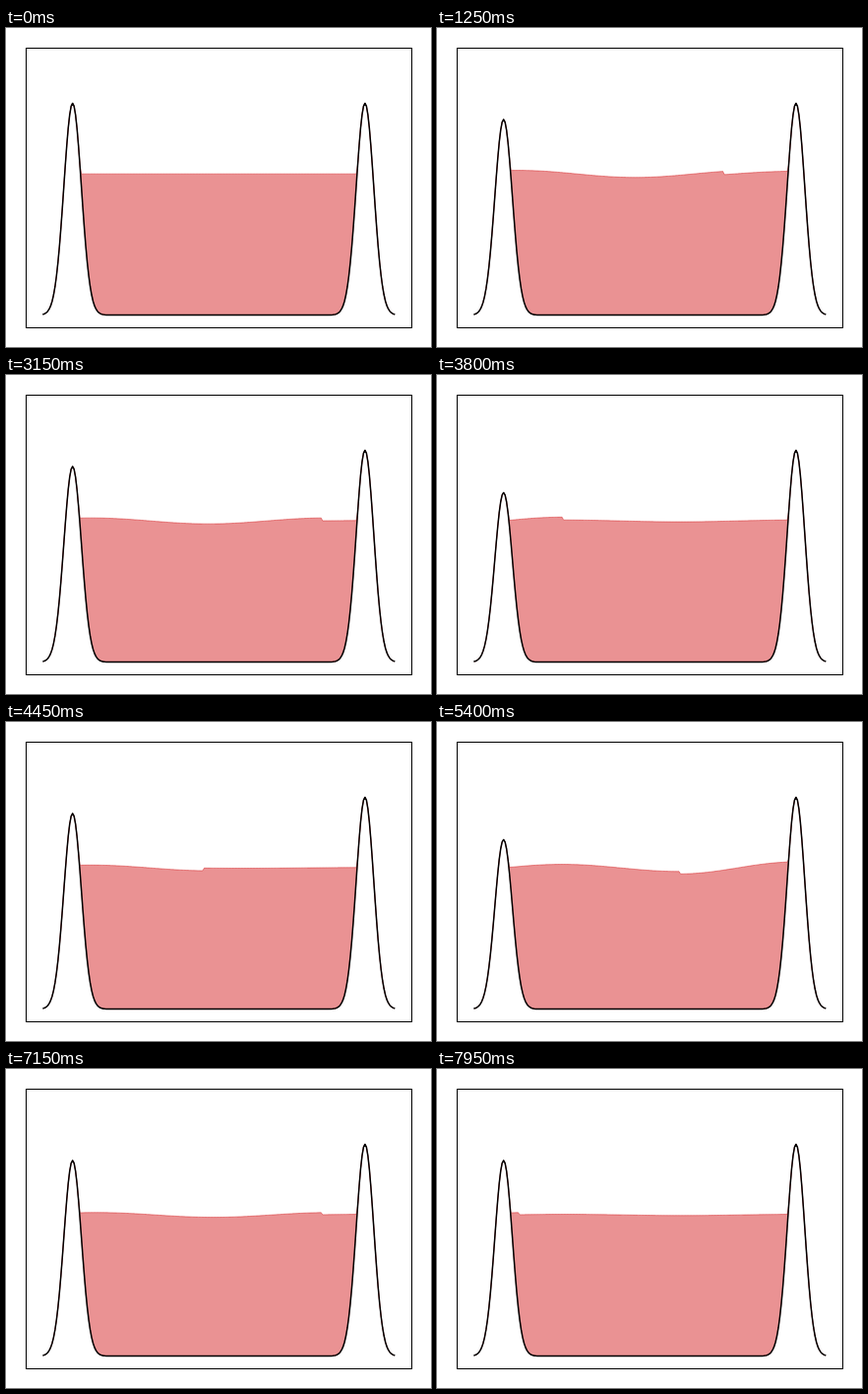
An HTML page that plays this animation: 432 by 324 pixels, repeating every 8000 ms.

```html
<!DOCTYPE html>
<html lang="en">
<head>
<meta charset="utf-8">
<title>Waves between two barriers</title>
<style>
  html, body { margin: 0; width: 100%; height: 100%; overflow: hidden; background: #fff; }
  svg { display: block; width: 100vw; height: 100vh; }
</style>
</head>
<body>
<svg viewBox="0 0 432 324">
  <path id="fluid" fill="#d62728" stroke="#d62728" stroke-width="1" opacity="1"
        fill-opacity=".5" stroke-opacity=".5" stroke-linejoin="round"/>
  <path id="wall" fill="none" stroke="#000" stroke-width="1.5"
        stroke-linejoin="round" stroke-linecap="square"/>
  <rect x="20.5" y="20.5" width="392" height="284" fill="none" stroke="#000" stroke-width="1"/>
</svg>
<script>
const STEP = 50, FRAMES = 160;
const POINTS = 240;
const SPAN = 10;          // distance between the barriers
const SIGMA = 0.3;
const LEVEL = 2;
const AMP = 0.05;
const REFLECT = 0.93;     // kept at each bounce
const K = Math.PI / 4;
const SPEED = 0.5;        // units per step

const fluid = document.getElementById('fluid');
const wall = document.getElementById('wall');

const px = x => (216.3 + x * 29.72).toFixed(2);
const py = y => (291.6 - y * 71.72).toFixed(2);
const bump = d => Math.exp(-d * d / (2 * SIGMA * SIGMA));
const line = pts => pts.map(([x, y]) => px(x) + ' ' + py(y)).join('L');

// Sum of the emitted wave and every echo that has arrived
function surface(x, front) {
  const w = x + SPAN / 2;
  let sum = 0, gain = AMP;
  for (let j = 0; j * SPAN < front; j++) {
    const path = j % 2 ? (j + 1) * SPAN - w : j * SPAN + w;
    if (path < front - 1e-6) sum -= gain * Math.cos(K * (front - path));
    gain *= REFLECT;
  }
  return LEVEL + sum;
}

function draw(n) {
  const front = n * SPEED;
  const left = 3 + 0.6 * Math.sin(K * front);
  const floor = [], top = [];
  for (let i = 0; i <= POINTS; i++) {
    const x = -6 + 12 * i / POINTS;
    const v = left * bump(x + 5) + 3 * bump(x - 5);
    floor.push([x, v]);
    top.push([x, Math.abs(x) < 5 ? Math.max(v, surface(x, front)) : v]);
  }
  wall.setAttribute('d', 'M' + line(floor));
  fluid.setAttribute('d', 'M' + line(top) + 'L' + line(floor.reverse()) + 'Z');
}

const start = performance.now();
let shown = -1;
function tick() {
  const n = Math.floor((performance.now() - start) / STEP) % FRAMES;
  if (n !== shown) draw(shown = n);
  requestAnimationFrame(tick);
}
tick();
</script>
</body>
</html>
```
